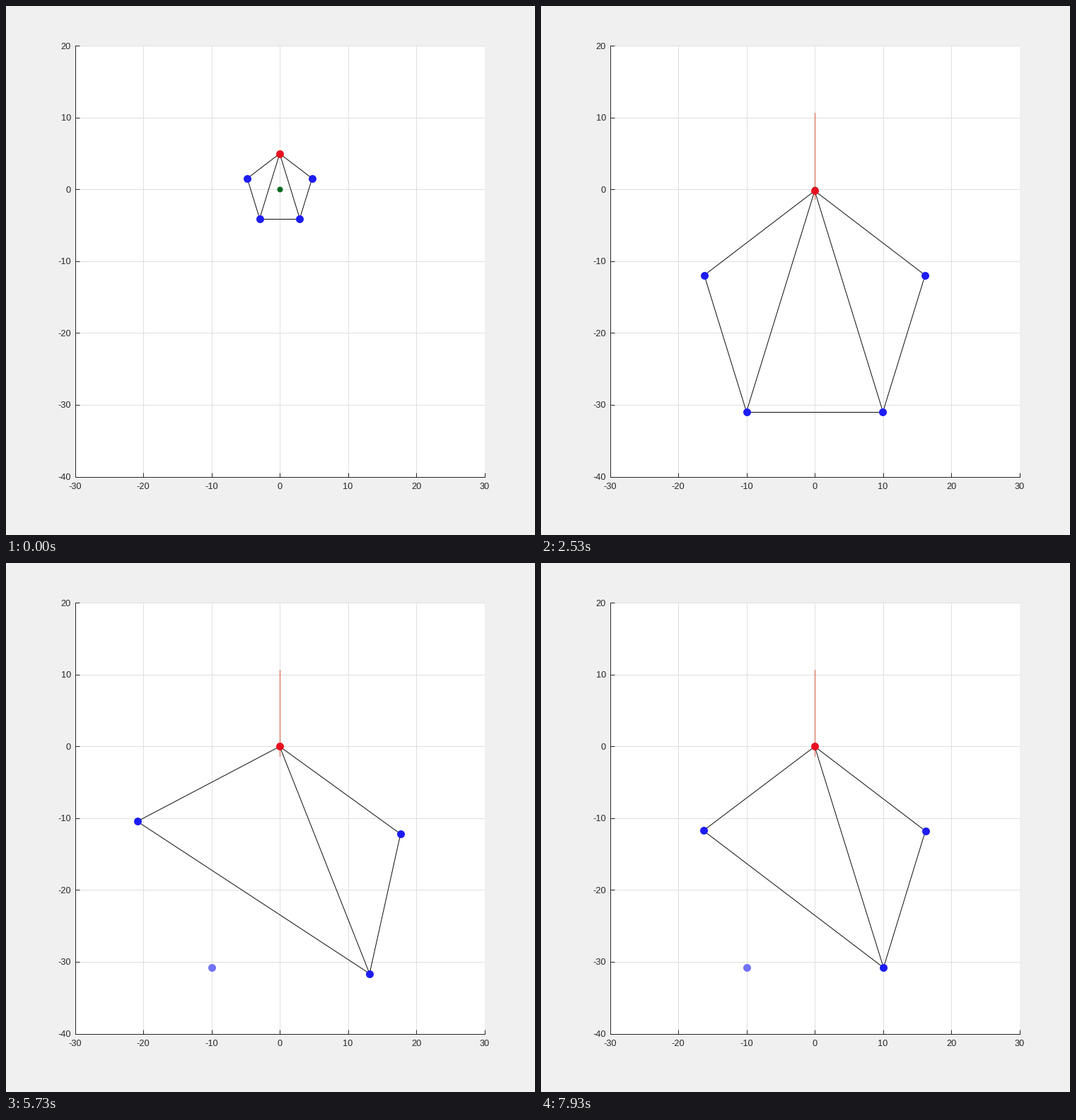
A matplotlib script for the animation above (8000 ms loop, 748 by 748 pixels).

```python
import math

import numpy as np
import matplotlib.pyplot as plt
from matplotlib.animation import FuncAnimation

SIZE, DPI = 748, 100
FRAMES, LOOP = 120, 8000
PX = 72 / DPI  # one pixel in points

LEFT, RIGHT, TOP, BOTTOM = 97.5, 676.5, 56.5, 665.5
INK, GRID = "#262626", "#dfdfdf"
RED, BLUE, FADED, GREEN = "#e81020", "#1c1cf4", "#7272f6", "#00691c"

# Agents: leader, left, bottom left, bottom right, right
ANGLES = np.radians(90 + 72 * np.arange(5))
PENTAGON = np.column_stack([np.cos(ANGLES), np.sin(ANGLES)])
START_R, FINAL_R = 5.0, 10 / math.sin(math.pi / 5)
LINKS = [(0, 1), (1, 2), (2, 3), (3, 4), (4, 0), (0, 2), (0, 3)]
LINKS_AFTER = [(0, 1), (1, 3), (3, 4), (4, 0), (0, 3)]

MOVE, PEAK, LOSS = 4, 8, 79
PEAK_Y, HALF_SWING = 10.65, 18.5
LOST = 2
PUSH = np.array([(0, 0), (-4.37, 1.23), (0, 0), (2.95, -0.8), (1.42, -0.4)])


def radius(i):
    a = 0.7 * max(i - MOVE, 0)
    return FINAL_R - (FINAL_R - START_R) * math.exp(-a) * (1 + a)


def leader_y(i):
    """Thrown up by the expansion, then a damped swing to the target."""
    if i <= PEAK:
        p = max(i - MOVE, 0) / (PEAK - MOVE)
        return START_R + (PEAK_Y - START_R) * p * p * (3 - 2 * p)
    t = i - PEAK
    w, s = math.pi / HALF_SWING, 2.06 / HALF_SWING
    return PEAK_Y * math.exp(-s * t) * (math.cos(w * t) + s / w * math.sin(w * t))


def push(i):
    """Disturbance after an agent is lost: quick rise, slow decay."""
    def shape(t):
        return math.exp(-0.112 * t) * (1 - math.exp(-0.5 * t)) ** 2
    return shape(max(i - LOSS, 0)) / shape(7)


def positions(i):
    r = radius(i)
    return PENTAGON * r + (0, leader_y(i) - r) + PUSH * push(i)


LEADER_PATH = [leader_y(i) for i in range(FRAMES)]

fig = plt.figure(figsize=(SIZE / DPI, SIZE / DPI), dpi=DPI, facecolor="#f0f0f0")
ax = fig.add_axes([LEFT / SIZE, 1 - BOTTOM / SIZE,
                   (RIGHT - LEFT) / SIZE, (BOTTOM - TOP) / SIZE])
ax.set(xlim=(-30, 30), ylim=(-40, 20), facecolor="white",
       xticks=range(-30, 31, 10), yticks=range(-40, 21, 10))
ax.set_xticklabels([str(v) for v in range(-30, 31, 10)])
ax.set_yticklabels([str(v) for v in range(-40, 21, 10)])
ax.set_axisbelow(True)
ax.grid(color=GRID, lw=PX)
for side in ("top", "right"):
    ax.spines[side].set_visible(False)
for side in ("left", "bottom"):
    ax.spines[side].set(color=INK, linewidth=PX)
ax.tick_params(direction="in", length=6 * PX, width=PX, color=INK, labelcolor=INK)
ax.tick_params(axis="x", pad=8.5 * PX)
ax.tick_params(axis="y", pad=5.5 * PX)
for label in ax.get_xticklabels() + ax.get_yticklabels():
    label.set(fontfamily="Liberation Sans", fontsize=12.8 * PX)
for label in ax.get_yticklabels():
    label.set_va("center_baseline")


def dot(color, size, z):
    return ax.plot([], [], "o", color=color, ms=size * PX, mew=0, zorder=z)[0]


links = [ax.plot([], [], color="#101010", lw=PX, zorder=3)[0] for _ in LINKS]
goal = dot(GREEN, 8, 4)
goal.set_data([0], [0])
trail = [ax.plot([], [], color=c, lw=PX, zorder=5, solid_capstyle="butt")[0]
         for c in ("#6b4a20", "#d2553c")]
dots = [dot(RED if k == 0 else BLUE, 11, 7 if k == 0 else 6) for k in range(5)]


def draw(i):
    pts = positions(i)
    lost = i >= LOSS
    active = LINKS_AFTER if lost else LINKS
    for k, line in enumerate(links):
        line.set_visible(k < len(active))
        if k < len(active):
            line.set_data(*pts[list(active[k])].T)
    for p, marker in zip(pts, dots):
        marker.set_data([p[0]], [p[1]])
    dots[LOST].set_color(FADED if lost else BLUE)
    path = LEADER_PATH[:i + 1]
    for x, line in zip((-0.05, 0.05), trail):
        line.set_data([x, x], [min(path), max(path)])
    return links + trail + dots


anim = FuncAnimation(fig, draw, frames=FRAMES, interval=LOOP / FRAMES,
                     init_func=lambda: draw(0), repeat=True, repeat_delay=0)
plt.show()
```
